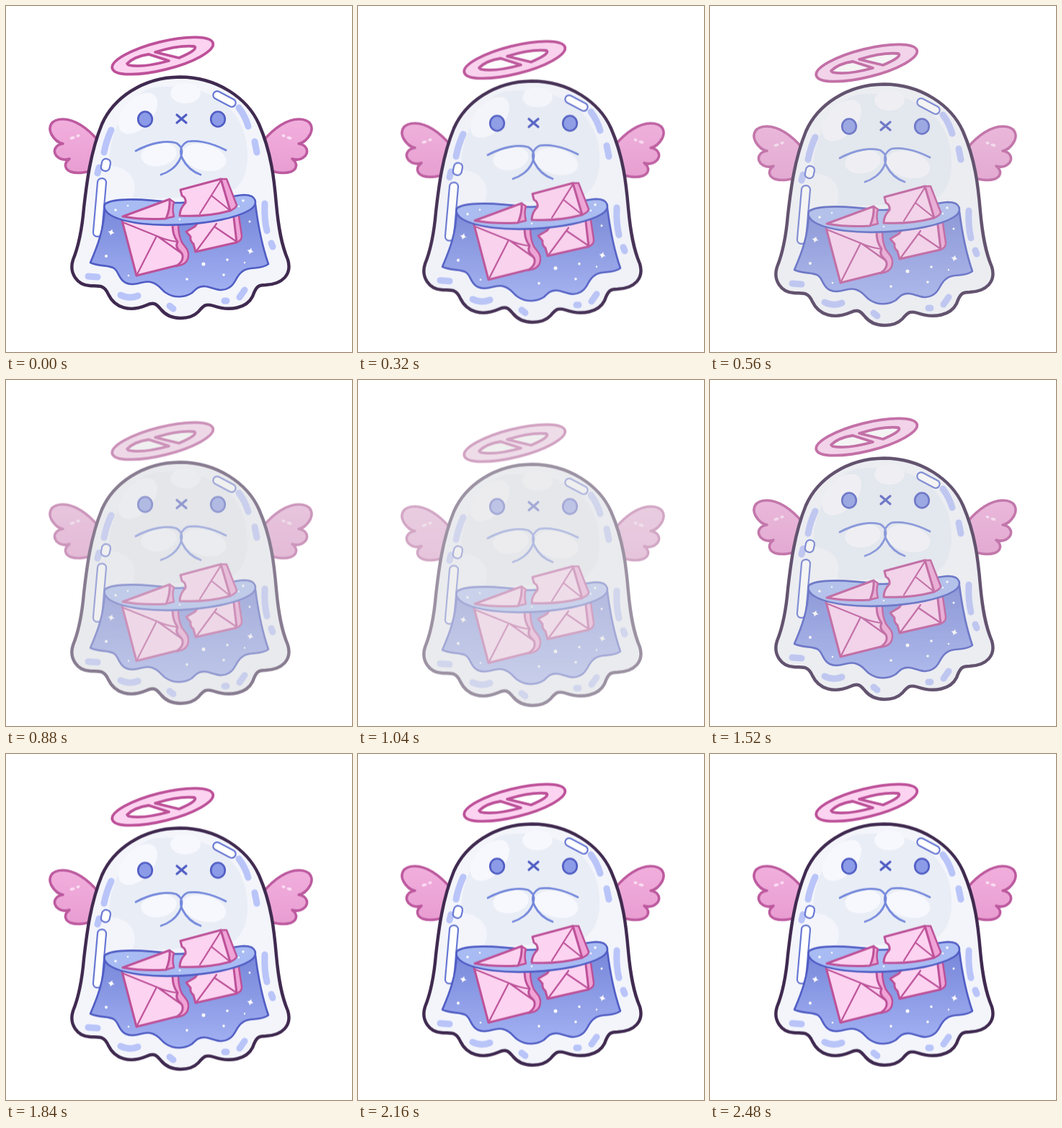
Animation of 480x480 px, one loop 2.56 s. Source, as an HTML page:

```html
<!DOCTYPE html>
<html lang="en">
<head>
<meta charset="utf-8">
<title>Floating ghost</title>
<style>
  html, body { margin: 0; width: 100%; height: 100%; overflow: hidden; background: #fff; }
  svg { display: block; width: 100vw; height: 100vh; }
  .pink { fill: #fcd3f0; stroke: #bd5199; stroke-width: 3; }
  .side { fill: #f0a3d7; stroke: #bd5199; stroke-width: 2.5; }
  .fold { fill: none; stroke: #bd5199; stroke-width: 2.2; }
  .blue { stroke: #505dc4; stroke-width: 2.6; }
  .glass { fill: #fff; stroke: #6878d4; stroke-width: 2.2; }
  .glint { fill: none; stroke: #b9c4f9; stroke-width: 9; }
  .white { fill: #fff; }
</style>
</head>
<body>
<svg viewBox="0 0 480 480" stroke-linecap="round" stroke-linejoin="round">
  <defs>
    <linearGradient id="liquid" x2="0" y2="1">
      <stop offset="0" stop-color="#7887d9"/>
      <stop offset="1" stop-color="#a3b2f3"/>
    </linearGradient>
    <linearGradient id="feather" x2="0" y2="1">
      <stop offset="0" stop-color="#f1afdd"/>
      <stop offset="1" stop-color="#e99dd2"/>
    </linearGradient>
    <g id="wing">
      <path fill="url(#feather)" stroke="#bd5a9f" stroke-width="3.6" d="M128 187C113 169 95 157 79 157C62 157 58 168 63 178C67 185 73 190 79 191C67 193 65 202 70 208C75 213 82 214 88 212C79 219 82 227 90 230C99 233 108 231 118 229"/>
      <g fill="#fbdcf2">
        <ellipse cx="92" cy="183" rx="3.5" ry="2" transform="rotate(-15 92 183)"/>
        <ellipse cx="100" cy="180" rx="2.6" ry="2" transform="rotate(-15 100 180)"/>
      </g>
    </g>
    <path id="spark" d="M0-5Q.7-.7 5 0Q.7.7 0 5Q-.7.7-5 0Q-.7-.7 0-5Z" transform="rotate(15)"/>
  </defs>

  <g id="ghost">
    <!-- halo -->
    <g class="pink" style="stroke-width:3.8">
      <ellipse cx="217.3" cy="69" rx="72" ry="19.5" transform="rotate(-14 217.3 69)"/>
      <path class="white" d="M168 80Q178 70 198 67L226 76Q190 86 170 82Z"/>
      <path class="white" d="M207 64Q240 54 261 56Q268 60 240 72Z"/>
    </g>

    <use href="#wing"/>
    <use href="#wing" transform="matrix(-1 0 0 1 485 0)"/>

    <!-- body -->
    <path fill="#f3f5fb" stroke="#402a50" stroke-width="4.4" d="M241 98.500C189 99 149 128 133 164C117 203 112 245 108 280C105 315 100 335 93 352C87 371 99 387 116 388C129 389 136 386 142 400C151 419 172 425 195 415C206 410 209 414 215 421C228 437 255 436 267 424C275 414 278 413 288 416C311 424 334 419 342 403C347 389 350 387 360 387C384 386 397 372 391 352C382 331 378 308 375 275C372 240 368 203 351 164C335 128 293 98.500 241 98.500Z"/>
    <path fill="#e9edf6" d="M205 113C290 103 336 150 335 207C335 240 322 255 300 264L175 268C187 240 168 224 147 222C134 210 160 122 205 113Z"/>
    <g fill="#f7f8fd">
      <ellipse cx="183" cy="149" rx="34" ry="20" transform="rotate(-48 183 149)"/>
      <ellipse cx="249" cy="121" rx="21" ry="14"/>
      <ellipse cx="212" cy="206" rx="25" ry="16" transform="rotate(-10 212 206)"/>
      <ellipse cx="275" cy="210" rx="31" ry="18" transform="rotate(14 275 210)"/>
    </g>

    <path class="glint" d="M323 141Q332 153 336 167M345 188L348 203M359 274Q358 296 362 312M368 329L370 334M146 172Q139 187 136 203M129 224L127 232M114 375L127 376M159 401Q171 407 183 402M227 416L232 420M303 409L306 409M324 404L331 394"/>
    <rect class="glass" x="286" y="123.500" width="34" height="11" rx="5.500" transform="rotate(28 303 129)"/>
    <rect class="glass" x="124" y="239" width="12" height="81" rx="5.500" transform="rotate(5 130 279)"/>
    <rect class="glass" x="132.500" y="212" width="12" height="17" rx="5.500" transform="rotate(12 138.500 220)"/>

    <!-- face and arms -->
    <g class="blue" fill="#8b9be7">
      <ellipse cx="193" cy="157" rx="9.800" ry="10.500"/>
      <ellipse cx="294" cy="157" rx="9.800" ry="10.500"/>
      <path stroke-width="3.200" d="M237 151L250 162M250 151L237 162"/>
    </g>
    <path fill="none" stroke="#7488dc" stroke-width="2.800" d="M180 201C202 189 225 186 236 190C247 196 245 206 240 215C235 224 225 231 215 234M305 200C282 188 262 186 252 188C242 193 240 202 245 212C250 222 259 230 270 234"/>

    <!-- liquid -->
    <path class="blue" fill="url(#liquid)" d="M137 278C136 310 127 333 117 356C130 362 143 359 150 364C157 369 156 379 166 384C178 390 190 380 201 383C213 386 214 393 222 398C234 406 249 404 258 398C264 392 268 388 277 389C288 391 298 398 309 391C319 386 318 376 327 369C337 360 352 367 364 358C355 332 350 307 346 275Z"/>
    <g class="white">
      <use href="#spark" transform="translate(146 314)"/>
      <use href="#spark" transform="translate(339 340)"/>
      <circle cx="139" cy="347" r="2"/>
      <circle cx="274" cy="358" r="2.500"/>
      <circle cx="251" cy="379" r="1.800"/>
      <circle cx="307" cy="352" r="1.800"/>
      <circle cx="302" cy="373" r="1.800"/>
      <circle cx="338" cy="299" r="1.500"/>
      <circle cx="170" cy="374" r="1.300"/>
      <circle cx="331" cy="356" r="1.200"/>
    </g>

    <!-- submerged halves of the letter -->
    <path class="side" d="M230 300L239 302C239 315 241 322 244 328C248 334 254 338 253 347Q252 356 244 359L236 361Z"/>
    <path class="pink" d="M160 294L181 374L237 360C245 355 248 347 242 341C237 337 235 333 238 327C233 320 231 314 231 300Z"/>
    <path class="fold" d="M162 300L209 319Q222 325 237 327M209 319L181 374M211 320L242 342"/>
    <path class="side" d="M313 285L322 285L327 318Q328 325 320 328Z"/>
    <path class="pink" d="M268 298L262 306L250 313L256 320Q255 326 260 330L263 341L320 328L315 285Z"/>
    <path class="fold" d="M292 302L264 340M289 306L320 327"/>

    <!-- surface -->
    <path class="blue" fill="#a8bbf3" d="M137 275C148 266 190 267 231 273C270 274 305 264 330 262C348 262 351 275 338 283C302 305 184 313 145 290C137 285 135 280 137 275Z"/>
    <g class="white">
      <circle cx="152" cy="283" r="1.800"/>
      <circle cx="169" cy="277" r="1.300"/>
      <circle cx="241" cy="296" r="1.300"/>
      <circle cx="329" cy="270" r="1.800"/>
      <circle cx="323" cy="278" r="1.200"/>
    </g>

    <!-- floating halves of the letter -->
    <path class="side" d="M227 268L233 272Q230 281 233 292L221 295Z"/>
    <path class="pink" d="M162 292L227 268Q228 281 222 295Q190 297 162 292Z"/>
    <path class="side" d="M298 240L306 240L320 276Q320 280 311 284Z"/>
    <path class="pink" d="M242 255L298 240L311 284Q278 293 241 291Q241 281 249 273Q250 266 244 263Z"/>
    <path class="fold" d="M298 242L269 288M285 263L310 283"/>
  </g>
</svg>
<script>
  const FRAME = 80, COUNT = 32, LOWEST = 13, STEP = 1.42;
  const ghost = document.getElementById('ghost');

  function draw(now) {
    const frame = Math.floor(now / FRAME) % COUNT;
    // Steps below the highest point: a linear fall and rise
    const depth = Math.abs(COUNT / 2 - Math.abs(frame - LOWEST));
    const fade = Math.max(0, depth - 6) / 20;
    ghost.setAttribute('transform', `translate(0 ${(depth - 3) * STEP})`);
    // The ghost greys a little while it turns see-through
    ghost.style.filter = `brightness(${1 - fade / 4})`;
    ghost.style.opacity = 1 - fade;
    requestAnimationFrame(draw);
  }
  draw(performance.now());
</script>
</body>
</html>
```
